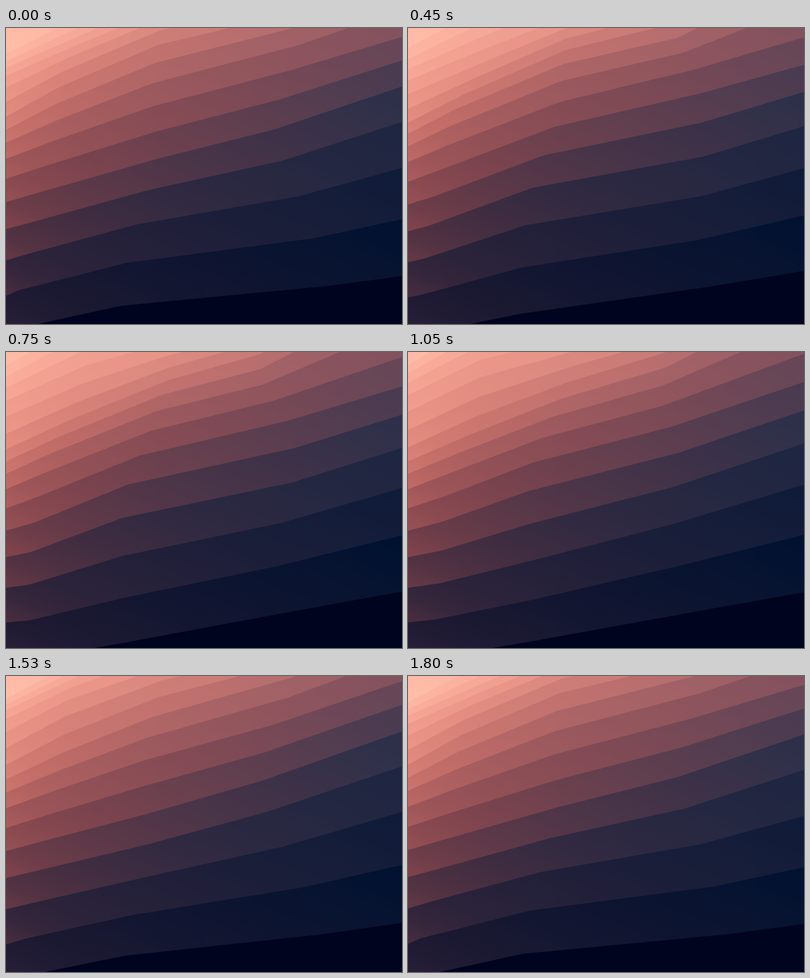
These frames come from a looping animation (800 px wide and 600 px high, 1830 ms). An HTML page with a canvas:

```html
<!DOCTYPE html>
<html lang="en">
<head>
<meta charset="utf-8">
<title>Drifting layers</title>
<style>
html, body { margin: 0; width: 100%; height: 100%; overflow: hidden; background: #00041f; }
canvas { display: block; width: 100vw; height: 100vh; }
</style>
</head>
<body>
<canvas id="stage" width="800" height="600"></canvas>
<script>
const ctx = document.getElementById('stage').getContext('2d');
const STEP = 30, STEPS = 61, RIDGES = 16, KEY_GAP = 3;

// Heights of every third ridge, bottom to top, at the edges and the three bends
const left = [625, 412, 272, 188, 95, 39];
const bendA = [617, 398, 237, 128, 27, -45];
const bendB = [577, 336, 163, 48, -30, -100];
const bendC = [525, 269, 95, -14, -80, -150];
const right = [494, 190, 12, -150, -220, -280];

// Dark to light, one colour for every third level
const palette = [[0, 4, 31], [46, 34, 56], [132, 68, 76], [193, 106, 101],
  [230, 141, 128], [248, 167, 150], [255, 189, 168], [255, 208, 184]];
const DARKEST = -2;

const clamp = (v, lo, hi) => Math.min(hi, Math.max(lo, v));

// Smooth curve through the key heights
function heightAt(keys, i) {
  const n = keys.length;
  const j = clamp(Math.floor(i / KEY_GAP), 0, n - 2), t = i / KEY_GAP - j;
  const p1 = keys[j], p2 = keys[j + 1];
  const p0 = j ? keys[j - 1] : 3 * keys[0] - 3 * keys[1] + keys[2];
  const p3 = j < n - 2 ? keys[j + 2] : 2 * p2 - p1;
  return p1 + t / 2 * (p2 - p0 + t * (2 * p0 - 5 * p1 + 4 * p2 - p3 +
    t * (3 * (p1 - p2) + p3 - p0)));
}

function colorAt(level, tint) {
  const pos = clamp((level - DARKEST) / 3, 0, palette.length - 1);
  const j = Math.min(Math.floor(pos), palette.length - 2);
  const blue = [0, 14, 18];
  const rgb = palette[j].map((v, c) =>
    Math.round(v + (palette[j + 1][c] - v) * (pos - j) + blue[c] * tint));
  return `rgb(${rgb})`;
}

// Each band darkens and turns bluer from its lower left corner
function bandFill(k) {
  if (k === 0) return '#00041f';
  const y = heightAt(left, k - 1), stops = 10;
  const g = ctx.createLinearGradient(0, y, 197, y - 491);
  for (let i = 0; i <= stops; i++) {
    const t = i / stops;
    g.addColorStop(t, colorAt(k - 3 * t ** 0.6, t));
  }
  return g;
}

const fills = Array.from({ length: RIDGES + 1 }, (_, k) => bandFill(k));

// Every bend sways once per loop, with a lag that changes from ridge to ridge
function ridge(i, angle) {
  const wave = (size, lag) => size * Math.cos(angle - lag * Math.PI / 180);
  const arch = Math.sin(Math.PI * i / 10);
  const hump = Math.sin(Math.PI * Math.min(i, 8) / 8) ** 2;
  const edgeLag = 180 - 25 * Math.max(0, i - 8);
  const rightLag = 115 * hump - 10;
  const slide = wave(40, rightLag);
  return [
    [0, heightAt(left, i) + wave(2 + 0.8 * i, edgeLag)],
    [Math.min(30 + 10 * i, 155) + wave(17, 175 + 125 * arch),
      heightAt(bendA, i) + wave(6 + 0.5 * i, edgeLag - 20)],
    [Math.min(235 + 9 * i, 320) + wave(10 + 20 * hump, 30 * i - 114),
      heightAt(bendB, i) + wave(14, 170 + 85 * arch)],
    [550 + 60 * 0.5 ** i + slide,
      heightAt(bendC, i) - slide * (0.05 + 0.055 * Math.min(i, 8))],
    [800, heightAt(right, i) + wave(9, rightLag)]
  ];
}

function draw(now) {
  const angle = Math.floor(now / STEP) % STEPS / (STEPS - 1) * 2 * Math.PI;
  ctx.fillStyle = fills[RIDGES];
  ctx.fillRect(0, 0, 800, 600);
  for (let i = RIDGES - 1; i >= 0; i--) {
    ctx.beginPath();
    for (const [x, y] of ridge(i, angle)) ctx.lineTo(x, y);
    ctx.lineTo(800, 700);
    ctx.lineTo(0, 700);
    ctx.fillStyle = fills[i];
    ctx.fill();
  }
}

const start = performance.now();
function tick() {
  draw(performance.now() - start);
  requestAnimationFrame(tick);
}
tick();
</script>
</body>
</html>
```
